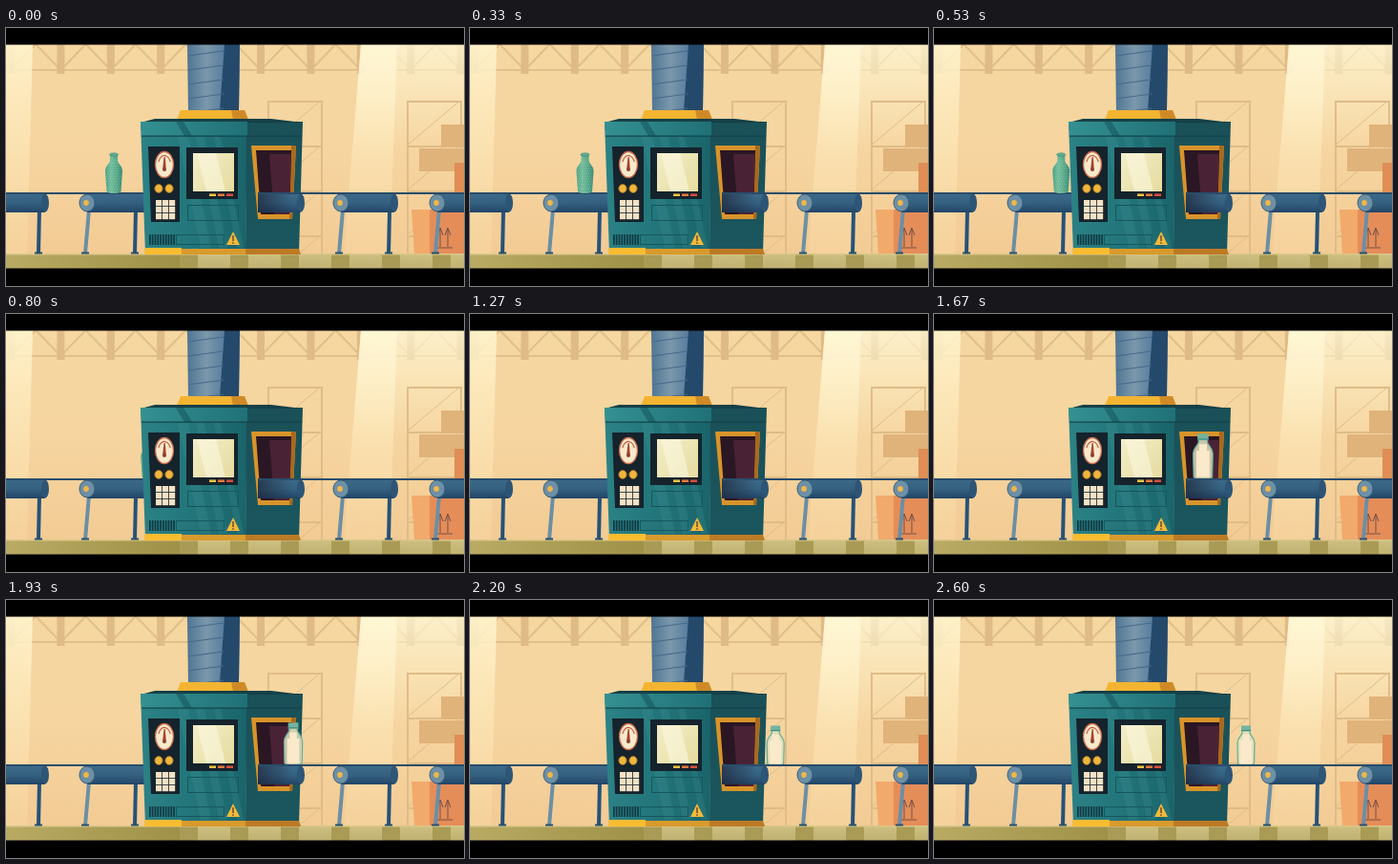
An HTML page with a canvas that plays this animation: 480x270 px, repeating every 2670 ms.

```html
<!DOCTYPE html>
<html lang="en">
<head>
<meta charset="utf-8">
<title>Bottle machine</title>
<style>
html, body { margin: 0; width: 100%; height: 100%; overflow: hidden; background: #000; }
canvas { display: block; width: 480px; height: 270px; }
</style>
</head>
<body>
<canvas id="stage" width="480" height="270"></canvas>
<script>
const LOOP = 2670, STEP = LOOP / 40;
const TOP = 17, FLOOR = 237, BOTTOM = 252, BELT = 173;
const ctx = document.getElementById('stage').getContext('2d');

const clamp = (v, lo, hi) => Math.min(hi, Math.max(lo, v));

function rect(x, y, w, h, fill) {
  ctx.fillStyle = fill;
  ctx.fillRect(x, y, w, h);
}
// Four-sided shape with level top and bottom; the bottom corners shift by dl and dr.
function slab(left, right, top, bottom, fill, dl = 0, dr = dl) {
  ctx.beginPath();
  ctx.moveTo(left, top);
  ctx.lineTo(right, top);
  ctx.lineTo(right + dr, bottom);
  ctx.lineTo(left + dl, bottom);
  ctx.closePath();
  ctx.fillStyle = fill;
  ctx.fill();
}
function line(x0, y0, x1, y1, color, width = 1) {
  ctx.beginPath();
  ctx.moveTo(x0, y0);
  ctx.lineTo(x1, y1);
  ctx.strokeStyle = color;
  ctx.lineWidth = width;
  ctx.stroke();
}
function frame(x, y, w, h, color) {
  ctx.strokeStyle = color;
  ctx.lineWidth = 1;
  ctx.strokeRect(x + .5, y + .5, w, h);
}
function oval(x, y, rx, ry, fill, stroke, width = 1) {
  ctx.beginPath();
  ctx.ellipse(x, y, rx, ry, 0, 0, Math.PI * 2);
  ctx.fillStyle = fill;
  ctx.fill();
  if (!stroke) return;
  ctx.strokeStyle = stroke;
  ctx.lineWidth = width;
  ctx.stroke();
}
function ramp(x0, y0, x1, y1, ...colors) {
  const g = ctx.createLinearGradient(x0, y0, x1, y1);
  colors.forEach((c, i) => g.addColorStop(i / (colors.length - 1), c));
  return g;
}
const across = (x0, x1, ...colors) => ramp(x0, 0, x1, 0, ...colors);
const down = (y0, y1, ...colors) => ramp(0, y0, 0, y1, ...colors);

function drawShelf(x, w) {
  const wood = '#dfbc88';
  for (const post of [x, x + w]) rect(post, 76, 2, FLOOR - 76, wood);
  for (let y = 76; y < FLOOR; y += 47) {
    rect(x, y, w, 2, wood);
    line(x, y + 47, x + w, y, wood);
  }
}

function drawRoom() {
  rect(0, TOP, 480, FLOOR - TOP, down(TOP, FLOOR, '#f5d7a0', '#f6d5a0', '#f3cb94'));

  const steel = '#e0bf8c', bay = 52.4;
  rect(0, 43, 480, 2, steel);
  for (let x = 5; x < 480; x += bay) {
    line(x, 44, x + bay / 2, TOP, steel, 2);
    line(x + bay / 2, TOP, x + bay, 44, steel, 2);
    rect(x - 4, TOP, 8, 31, '#dfbb88');
  }

  const beam = down(TOP, FLOOR, 'rgba(255,244,205,.9)', 'rgba(254,233,187,.6)', 'rgba(250,222,170,.3)');
  slab(-9, 28, TOP, FLOOR, beam, -6);
  slab(372, 410, TOP, FLOOR, beam, -18, -8);
  slab(372, 480, TOP, 130, down(TOP, 130, 'rgba(255,248,215,.75)', 'rgba(255,248,215,0)'), -9, 0);

  drawShelf(274, 56);
  drawShelf(420, 56);
  for (const [x, y] of [[456, 101], [433, 126], [456, 126]]) rect(x, y, 24, 24, '#e0b37b');

  // Cartons
  rect(470, 141, 10, 33, '#df8e55');
  slab(425, 444, 190, FLOOR, '#f1aa6c', 3, 0);
  rect(444, 190, 36, FLOOR - 190, '#e58d59');
  const ink = '#755044';
  for (const x of [455, 463]) {
    line(x, 229, x, 210, ink);
    for (const side of [-3, 3]) line(x, 209, x + side, 217, ink);
  }
  line(450, 230, 468, 230, ink);

  rect(0, FLOOR, 480, BOTTOM - FLOOR, down(FLOOR, BOTTOM, '#cdbf80', '#bfb171'));
  rect(0, FLOOR, 182, BOTTOM - FLOOR, across(0, 182, '#b9aa64', '#a09148'));
  for (let x = 182; x < 480; x += 53) rect(x, FLOOR, 19, BOTTOM - FLOOR, '#a99b55');
  rect(0, FLOOR - 1, 480, 1.5, '#d9c78a');
}

function drawTube(x0, x1) {
  rect(x0, BELT + 1, x1 - x0 - 4, 19, down(BELT, 193, '#3d6a8a', '#356180', '#224467'));
  oval(x1 - 4, 183, 4, 9.5, '#2c5576');
}
function drawLeg(x, color, lean) {
  slab(x - 2, x + 2, 190, 236, color, lean);
  rect(x + lean - 4, 234.5, 8, 2, '#29506f');
}
// One section has a pivot on a pale post, a roller and a dark leg near its end.
function drawSection(x, roller) {
  drawLeg(x + 2, '#6b8fa5', -4);
  drawLeg(x + 51, '#26527a', -1);
  drawTube(x, x + roller);
  oval(x, 183, 8, 9, '#6d90a6', '#355e7c');
  oval(x - 1, 183, 2.8, 3, '#efb747');
}
function drawBeltLine(x0, x1) {
  rect(x0, BELT - 1, x1 - x0, 2, '#294d6b');
}
function drawLeftBelt() {
  drawLeg(35, '#26527a', -1);
  drawTube(0, 45);
  drawSection(85, 67);
  drawBeltLine(0, 147);
}
function drawRightBelt() {
  drawSection(351, 60);
  drawSection(452, 60);
  drawTube(264, 313);
  rect(264, BELT, 36, 20, across(264, 300, 'rgba(28,30,48,.6)', 'rgba(28,30,48,0)'));
  drawBeltLine(264, 480);
}

function drawPipe() {
  slab(190, 245, TOP, 87, across(190, 230, '#4f7594', '#7c98ab', '#567b9c'), 1, -1);
  slab(229, 245, TOP, 87, '#24496b', -5, -1);
  for (let y = 24; y < 87; y += 15) line(191, y + 5, 228, y, '#44698a');
  slab(183, 250, 86, 96, '#f3b431', -4, 4);
  slab(236, 250, 86, 96, '#cf8a27', 2, 4);
}

function drawGauge(x, y) {
  oval(x, y, 9.5, 13.5, '#f7e9cb', '#cb6a48', 1.3);
  ctx.beginPath();
  ctx.ellipse(x, y, 6.5, 9.5, 0, Math.PI * 1.1, Math.PI * 1.9);
  ctx.strokeStyle = '#c65a42';
  ctx.lineWidth = 1.2;
  ctx.stroke();
  slab(x - .4, x + .8, y - 8, y + 5, '#a93f32', -1.5, 1);
  oval(x, y + 5, 2, 2, '#8d4036');
}

function drawControls() {
  const black = '#15232c';
  slab(149, 182, 124, 203, black, 3, 0);
  drawGauge(166, 143);
  for (const x of [160, 171]) oval(x, 168, 4.2, 4.5, '#f0b73d', '#8a6028');
  for (let i = 0; i < 9; i++)
    rect(157 + i % 3 * 7, 180 + Math.floor(i / 3) * 7, 6.2, 6.2, '#f5e1c4');

  rect(189, 125, 54, 54, black);
  rect(196, 131, 43, 40, ramp(196, 131, 239, 171, '#f3edc8', '#e5dc9f'));
  slab(200, 220, 131, 171, 'rgba(252,248,224,.6)', 10);
  ['#f2c346', '#ed783d', '#d9503c'].forEach((c, i) => rect(213 + i * 9, 173.5, 7, 2.5, c));

  frame(190, 185, 53, 16, '#16575f');
  frame(178, 216, 50, 10, '#16575f');
  for (let x = 150; x < 176; x += 2.8) rect(x, 216, 1.7, 11, '#123a42');
  slab(238, 238, 213, 227, '#f3b93c', -7, 7);
  line(238, 217, 238, 223, '#674c2b', 1.5);
  rect(237.2, 224.2, 1.6, 1.5, '#674c2b');
}

function drawOpening() {
  slab(257, 304, 123, 200, '#d8942a', 7, -4);
  slab(299, 304, 123, 200, '#a96a1d', -2, -4);
  slab(262, 299, 128, 195, '#2a1723', 5, -2);
  slab(276, 299, 132, 195, '#4a2236', 5, -2);
}

function drawMachine() {
  drawPipe();
  slab(141, 253, 98, 236, across(141, 253, '#2c8286', '#22757a', '#19646a'), 5, -2);
  slab(252, 311, 98, 236, down(98, 236, '#1a5057', '#1b565e'), -1, -4);
  slab(156, 278, 95, 99, '#144047', -15, 33);
  slab(141, 253, 98, 113, across(141, 253, '#349092', '#207177'), 1, 0);
  rect(142, 112.5, 168, 1.2, '#124349');
  for (let i = 0; i < 3; i++) slab(180 + i * 19, 191 + i * 17, 114, 230, 'rgba(90,170,165,.15)', 24);
  slab(178, 186, 98, 113, 'rgba(14,65,72,.4)', 9);
  drawControls();

  slab(146, 184, 230, FLOOR, '#f8bc30', -1, 0);
  slab(184, 251, 231, FLOOR, '#d99a2d');
  slab(251, 307, 231, FLOOR, '#bd7b25', 0, 2);
  drawOpening();
}

// Neck, curved shoulders and a nearly straight body; taper narrows the base.
function vesselPath(x, scale, taper) {
  const sides = [-1, 1].map(side => (w, h) => [x + side * w * scale, BELT - h * scale]);
  ctx.beginPath();
  for (const at of sides) {
    ctx.moveTo(x, BELT - 40 * scale);
    ctx.lineTo(...at(4, 40));
    ctx.lineTo(...at(4, 34));
    ctx.bezierCurveTo(...at(5, 30), ...at(9, 29), ...at(9, 23));
    ctx.lineTo(...at(9 - taper, 2));
    ctx.quadraticCurveTo(...at(8 - taper, 0), x, BELT);
  }
}

function drawVase(x) {
  ctx.save();
  vesselPath(x, 1, 1.5);
  ctx.fillStyle = across(x - 9, x + 9, '#4a9f86', '#74bd9c', '#58a98b', '#358670');
  ctx.fill();
  ctx.clip();
  for (let row = 0; row < 13; row++)
    for (let col = -4; col <= 4; col++)
      oval(x + col * 2.4 + row % 2 * 1.2, 139 + row * 2.7, .6, .6, 'rgba(165,218,187,.5)');
  ctx.restore();
  oval(x, 132.5, 4.6, 1.6, '#65b095', '#3d8a76', .8);
}

function drawBottle(x, scale) {
  const block = (w, top, h, fill) =>
    rect(x - w / 2 * scale, BELT - top * scale, w * scale, h * scale, fill);
  ctx.save();
  ctx.beginPath();
  ctx.rect(264, 110, 216, 66);
  ctx.clip();
  vesselPath(x, scale, .5);
  ctx.fillStyle = 'rgba(226,226,190,.85)';
  ctx.fill();
  ctx.strokeStyle = '#62ad9a';
  ctx.lineWidth = 1.2;
  ctx.stroke();
  block(12, 26, 24, '#fbe9cb');
  block(7, 32, 7, '#fbe9cb');
  block(10, 41.5, 6, '#73b3a0');
  block(10, 37, 1, '#408f81');
  ctx.restore();
}

// The vase waits and then rides in; the bottle rides out and then stops.
const vaseX = t => 113 + .0635 * Math.max(0, t - 215);
const bottleX = t => Math.min(327, 320 + .0717 * (t - 2200));
const bottleScale = t => 1 + .15 * clamp((2200 - t) / 530, 0, 1);

function draw(t) {
  drawRoom();
  drawLeftBelt();
  if (t < 1250) drawVase(vaseX(t));
  drawMachine();
  if (t >= 1290) drawBottle(bottleX(t), bottleScale(t));
  drawRightBelt();
  rect(0, 0, 480, TOP + .5, '#000');
  rect(0, BOTTOM - .5, 480, 270 - BOTTOM + .5, '#000');
}

const start = performance.now();
function tick() {
  const t = (performance.now() - start) % LOOP;
  // Steps start up to 5 ms early because delays are whole hundredths of a second.
  draw(Math.floor(t / STEP + .08) * STEP);
  requestAnimationFrame(tick);
}
tick();
</script>
</body>
</html>
```
